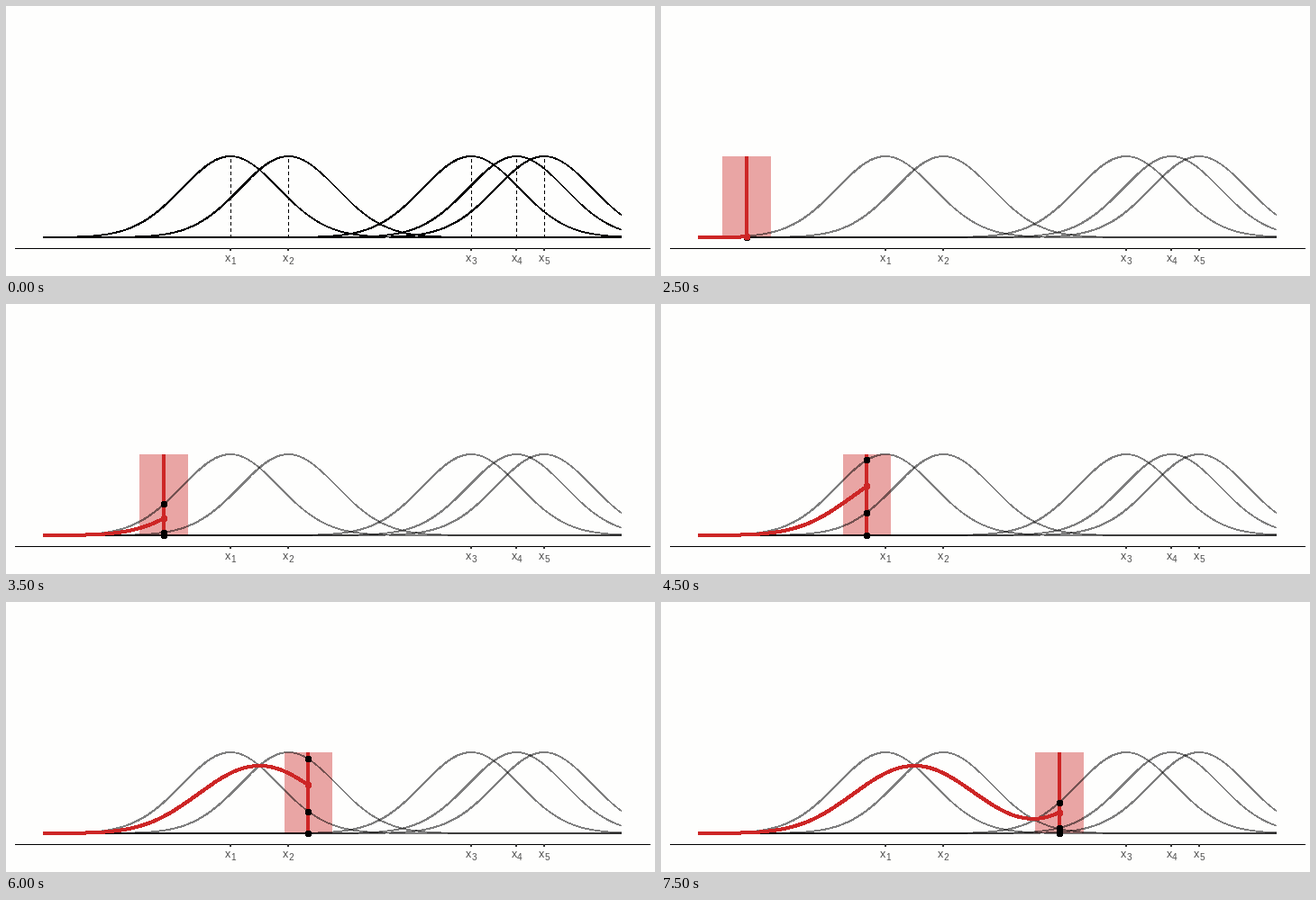
These frames come from a looping animation (720 px wide and 300 px high, 8 s). A matplotlib script:

```python
import numpy as np
import matplotlib.pyplot as plt
from matplotlib.animation import FuncAnimation
from matplotlib.patches import Circle, Rectangle

W, H, DPI = 720, 300, 100
PX = 72 / DPI  # points per pixel
RED, INK = "#cd2626", "black"

LEFT, STEP = 41.65, 26.69      # start of the curves, half-width of the window
RIGHT = LEFT + 24 * STEP
BASE, PEAK = 257, 90
SIGMA = 2 * STEP
CENTERS = np.array([249, 313.3, 516, 566.4, 597])

HOLD = 3                       # half-second ticks before the window starts
FRAMES = 16


def kernels(x):
    """Heights of all kernels at x, one row per centre."""
    z = (np.atleast_1d(x) - CENTERS[:, None]) / SIGMA
    return PEAK * np.exp(-z ** 2 / 2)


fig = plt.figure(figsize=(W / DPI, H / DPI), dpi=DPI, facecolor="#fefefd")
ax = fig.add_axes([0, 0, 1, 1])
ax.set(xlim=(0, W), ylim=(H, 0))
ax.axis("off")


def line(x, y, width, color=INK, **kw):
    kw.setdefault("solid_capstyle", "butt")
    return ax.plot(x, y, color=color, lw=width * PX, antialiased=False, **kw)[0]


def pen(x, y, nib=0.2):
    """Curve of a slanted nib: heavier when rising than when falling."""
    return line(np.r_[x - nib, np.nan, x + nib],
                np.r_[y - nib, np.nan, y + nib], 0.4, zorder=4)


def dot(color, z):
    return ax.add_patch(Circle((0, 0), 3.2, fc=color, lw=0,
                               antialiased=False, zorder=z))


def place(d, x, y):
    d.center = round(x) + 0.5, round(y) + 0.5


# Axis with ticks and labels
line([10, 714], [269, 269], 1)
for i, c in enumerate(CENTERS, 1):
    line([c, c], [269, 272], 2, "#333333")
    label = dict(family="Liberation Sans", color="#4d4d4d", va="baseline")
    ax.text(c - 6, 284, "x", size=12.5 * PX, **label)
    ax.text(c + 0.4, 287, str(i), size=10 * PX, **label)

# Kernels and their dashed centre lines
xs = np.linspace(LEFT, RIGHT, 400)
curves = [pen(xs, BASE - k) for k in kernels(xs)]
centers = [line([c, c], [BASE, BASE - PEAK], 1, zorder=3,
                linestyle=(0, (4, 4)), dash_capstyle="butt")
           for c in np.floor(CENTERS)]

# Moving window and the density it traces
band = Rectangle((0, BASE - PEAK), 0, PEAK, fc=RED, alpha=0.41, lw=0,
                 antialiased=False, zorder=2)
ax.add_patch(band)
cursor = line([], [], 4, RED, zorder=3)
hits = [dot(INK, 5) for _ in CENTERS]
trace = line([], [], 3, RED, zorder=6, solid_joinstyle="round")
tip = dot(RED, 7)
moving = [band, cursor, trace, tip, *hits]


def update(frame):
    n = frame - HOLD
    running = n >= 0
    for c in curves:
        c.set_alpha(0.5 if running else 1)
    for c in centers:
        c.set_visible(not running)
    for m in moving:
        m.set_visible(running)
    if running:
        x = LEFT + STEP * (n + n // 4)  # every fifth position is skipped
        start = max(x - STEP, LEFT)
        band.set_x(start)
        band.set_width(x + STEP - start)
        cursor.set_data([x, x], [BASE, BASE - PEAK])
        for d, k in zip(hits, kernels(x)[:, 0]):
            place(d, x, BASE - k)
        t = np.linspace(LEFT, x, 300)
        y = BASE - kernels(t).sum(axis=0) / 2
        trace.set_data(t, y)
        place(tip, x, y[-1])
    return curves + centers + moving


anim = FuncAnimation(fig, update, frames=FRAMES, interval=500,
                     repeat=True, repeat_delay=0, blit=False)
plt.show()
```
